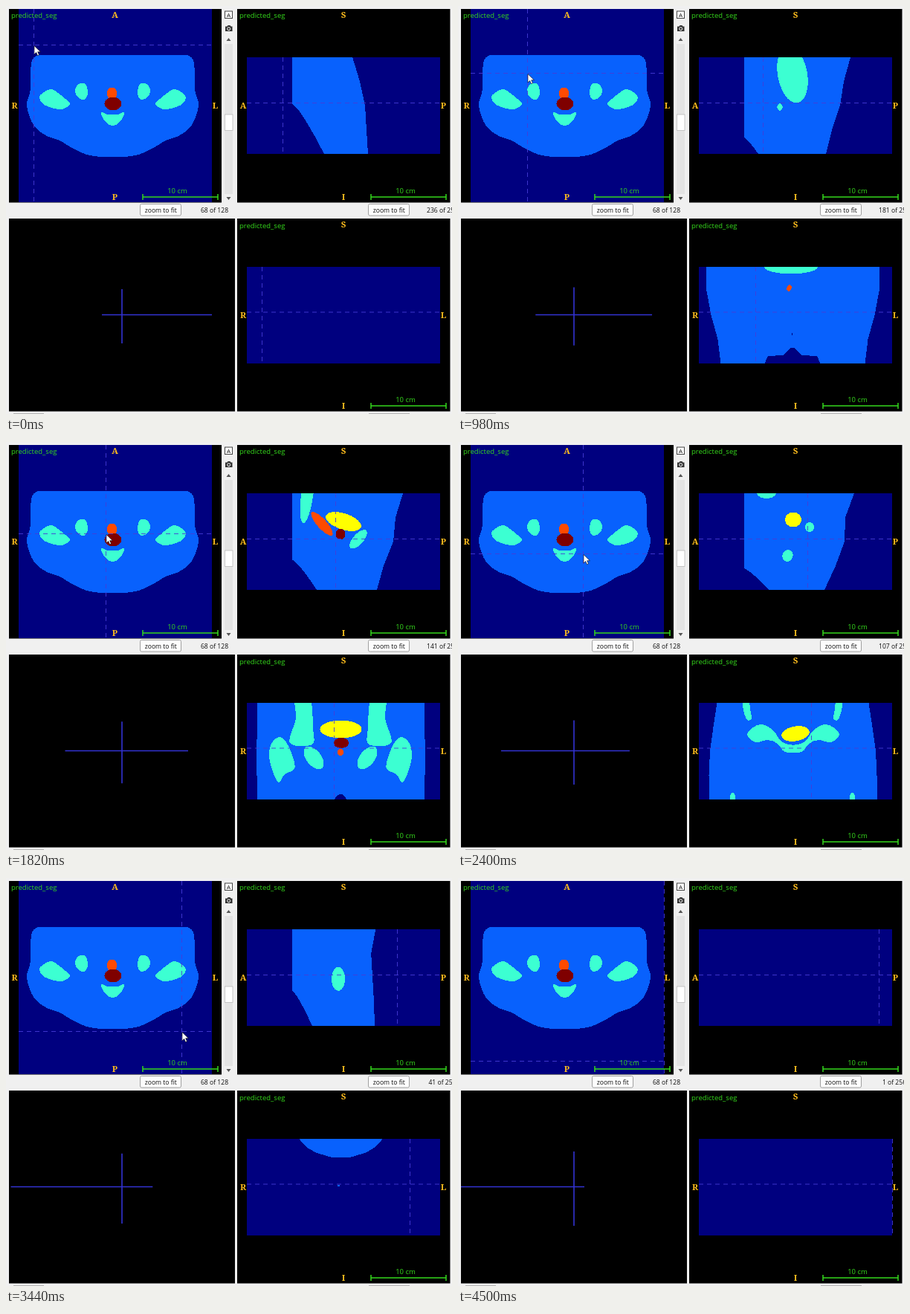
Animation of 600 by 549 pixels, one loop 4520 ms. Source, as an HTML page:

```html
<!DOCTYPE html>
<html lang="en">
<head>
<meta charset="utf-8">
<title>Segmentation viewer</title>
<style>
html, body { margin: 0; width: 100%; height: 100%; overflow: hidden; background: #f0f0f0; }
svg { display: block; width: 600px; height: 549px; }
text { font-family: "Open Sans", sans-serif; font-size: 8.6px; fill: #111; }
.tag, .cm { font-size: 9.5px; fill: #35d81c; }
.dir { font: bold 11.5px "Noto Serif", serif; fill: #ffbe1e; text-anchor: middle; }
.mid { text-anchor: middle; }
.scale { stroke: #35d81c; stroke-width: 1.5; fill: none; }
.dash { stroke: #463cd7; stroke-opacity: .88; stroke-dasharray: 6 5; fill: none; }
.axes { stroke: #3232d2; stroke-width: 1.6; fill: none; }
.btn { fill: #fdfdfd; stroke: #a0a0a0; }
.seg { shape-rendering: crispEdges; }
</style>
</head>
<body>
<svg viewBox="0 0 600 549">
  <defs>
    <clipPath id="sagClip"><rect x="324" y="69" width="260" height="130"/></clipPath>
    <clipPath id="corClip"><rect x="324" y="351" width="260" height="130"/></clipPath>
    <clipPath id="view3d"><rect x="4" y="286" width="304" height="259"/></clipPath>
    <g id="ruler"><path class="scale" d="M.5 0H101.5M.5-4V4M101.5-4V4"/><text class="cm mid" x="47" y="-5">10 cm</text></g>
  </defs>
  <rect width="600" height="549" fill="#f0f0f0"/>
  <path d="M4 4H290V264.5H4zM311 4H597.5V264.5H311zM4 286H308V545.5H4zM311 286H597.5V545.5H311z"/>
  <path class="seg" d="M17 4H277V264H17zM324 69H584V199H324zM324 351H584V481H324z" fill="#00007f"/>

  <g class="seg" id="axial"></g>
  <g class="seg" id="sag" clip-path="url(#sagClip)"></g>
  <g class="seg" id="cor" clip-path="url(#corClip)"></g>

  <path class="dash" id="axV"/><path class="dash" id="axH"/>
  <path class="dash" id="sagV"/><path class="dash" d="M324 130.5H584"/>
  <path class="dash" id="corV"/><path class="dash" d="M324 412H584"/>
  <path class="axes" id="axes" clip-path="url(#view3d)"/>

  <text class="tag" x="7" y="16">predicted_seg</text>
  <text class="tag" x="314" y="16">predicted_seg</text>
  <text class="tag" x="314" y="298.5">predicted_seg</text>
  <g id="dirs"></g>
  <use href="#ruler" x="183.5" y="257"/>
  <use href="#ruler" x="490.5" y="257"/>
  <use href="#ruler" x="490.5" y="538"/>

  <g id="bar">
    <rect x="294" y="51" width="11" height="202" fill="#e4e4e4"/>
    <rect x="294.5" y="146" width="10.5" height="21.5" fill="#fff" stroke="#bbb" stroke-width=".8"/>
    <path d="M296.5 47 299.5 43 302.5 47zM296.500 257 299.500 261 302.500 257z" fill="#555"/>
    <rect x="294.5" y="7" width="10" height="9.5" fill="#fff" stroke="#444"/>
    <text class="mid" x="299.5" y="15" style="font-size:8px">A</text>
    <path d="M295 27.5H297.5L298.500 26H301.500L302.500 27.500H304.500V34H295z" fill="#333"/>
    <circle cx="299.7" cy="30.7" r="2" fill="#333" stroke="#fff"/>
  </g>
  <rect class="btn" x="180.5" y="266.5" width="55" height="15.5" rx="2"/>
  <rect class="btn" x="487.5" y="266.5" width="55" height="15.5" rx="2"/>
  <path d="M10 548.5H51M488 548.5H543" stroke="#b0b0b0"/>
  <text class="mid" x="208.3" y="277.5">zoom to fit</text>
  <text class="mid" x="515.3" y="277.5">zoom to fit</text>
  <text class="mid" x="280.5" y="277.5">68 of 128</text>
  <text class="mid" x="587" y="277.5" id="slice"></text>
  <path id="mouse" d="M0 0V11.5L2.7 9 4.5 13.2 6.5 12.3 4.7 8.2H8.4z" fill="#fff" stroke="#000" stroke-width=".6"/>
</svg>
<script>
const LOOP = 4520, STEP = 20;
const DARK = '#00007f', BODY = '#0861fd', BONE = '#3cffd2', ORANGE = '#ff4a00', YELLOW = '#ffff00', RED = '#7f0000';
const $ = id => document.getElementById(id);
const lerp = (a, b, k) => a + (b - a) * k;

function add(parent, name, attrs) {
  const el = document.createElementNS('http://www.w3.org/2000/svg', name);
  for (const k in attrs) el.setAttribute(k, attrs[k]);
  return parent.appendChild(el);
}

const pts = s => s.split(',').map(q => q.trim().split(' ').map(Number));
const flip = (p, axis) => p.map(([x, y]) => [2 * axis - x, y]);
const sym = (half, axis) => [...half, ...flip(half, axis).reverse()];

// Ellipse outline turned clockwise by deg
function blob(cx, cy, rx, ry, deg = 0) {
  const r = deg * Math.PI / 180, n = 12;
  return Array.from({ length: n }, (_, i) => {
    const a = 2 * Math.PI * i / n, x = rx * Math.cos(a), y = ry * Math.sin(a);
    return [cx + x * Math.cos(r) - y * Math.sin(r), cy + x * Math.sin(r) + y * Math.cos(r)];
  });
}

// Vertical edge with evenly spaced rows
const edge = (xs, y0, h) => xs.map((x, i) => [x, y0 + h * i / (xs.length - 1)]);

// Side view: straight front that recedes below the cut, and a back edge
function sideBody(cut, foot, ...back) {
  const front = [0, .15, .35, .65, 1].map(k => [lerp(385, foot, k ** .8), lerp(cut, 199, k)]);
  return [[385, 69], ...front, ...edge(back, 69, 130).reverse()];
}

const frontBody = (h, ...half) => sym(edge(half.map(w => 450.5 - w), 351, h), 450.5);

const polygon = p => 'M' + p.map(q => q.map(v => v.toFixed(1)).join(' ')).join('L') + 'z';

// Closed Catmull-Rom curve through the points
function curve(p) {
  const n = p.length, at = i => p[(i + n) % n];
  let d = 'M' + p[0].join(' ');
  for (let i = 0; i < n; i++) {
    const [a, b, c, e] = [at(i - 1), at(i), at(i + 1), at(i + 2)];
    const h = [0, 1].map(j => b[j] + (c[j] - a[j]) / 6), g = [0, 1].map(j => c[j] - (e[j] - b[j]) / 6);
    d += 'C' + [...h, ...g, ...c].map(v => v.toFixed(1)).join(' ');
  }
  return d + 'z';
}

function scaled(p, k) {
  const c = [0, 1].map(j => p.reduce((s, q) => s + q[j], 0) / p.length);
  return p.map(q => q.map((v, j) => lerp(c[j], v, k)));
}

// Cross-section outline at a position: morphs between keys, grows in and shrinks out at the ends
function outline({ keys, from, to }, pos) {
  if (pos < from || pos > to) return null;
  const [first, a] = keys[0], [last, z] = keys[keys.length - 1];
  if (pos <= first) return from < first ? scaled(a, Math.sqrt((pos - from) / (first - from))) : a;
  if (pos >= last) return to > last ? scaled(z, Math.sqrt((to - pos) / (to - last))) : z;
  const i = keys.findIndex(k => k[0] > pos), [p0, A] = keys[i - 1], [p1, B] = keys[i];
  const k = (pos - p0) / (p1 - p0);
  return A.map((q, j) => [lerp(q[0], B[j][0], k), lerp(q[1], B[j][1], k)]);
}

function track(group, fill, from, to, keys, opt = {}) {
  return { keys, from, to, draw: curve, ...opt, el: add($(group), 'path', { fill }) };
}

function show(tr, pos) {
  const p = outline(tr, pos);
  let d = p ? tr.draw(p) : '';
  if (p && tr.mirror) d += tr.draw(flip(p, 450));
  tr.el.setAttribute('d', d);
}

// Axial slice
const MID = 143.5;
const femur = pts('46 120,60 112,70 117,80 125,86 132,75 139,58 136,48 130');
const pubis = pts('93 113,98 105,107 105,110 118,105 126,96 122');
[
  [BODY, sym(pts('100 66,50 66,41 67,34 77,33 112,28 132,33 152,41 165,55 175,72 181,91 192,118 202'), MID)],
  [BONE, femur], [BONE, flip(femur, MID)], [BONE, pubis], [BONE, flip(pubis, MID)],
  [BONE, sym(pts('137 146,128 143,131 152,139 160'), MID)],
  [ORANGE, blob(142.5, 117.5, 6.7, 8)],
  [RED, blob(144, 131.5, 11.5, 9)]
].forEach(([fill, p]) => add($('axial'), 'path', { fill, d: curve(p) }));

// Sagittal slices, by distance from the midline
const CENTRE = 143, NONE = -Infinity;
const sag = [
  track('sag', BODY, NONE, 117, [
    [8.5, sideBody(158, 418, 534, 524, 521, 508, 499)],
    [26, sideBody(170, 418, 533, 521, 520, 508, 493)],
    [49.5, sideBody(177, 404, 528, 519, 514, 503, 495)],
    [53.5, sideBody(176, 404, 526, 516, 514, 501, 494)],
    [93.5, sideBody(151, 412, 497, 491, 493, 495, 496)],
    [105.5, sideBody(131, 428, 466, 476, 483, 485, 487)]
  ], { draw: polygon }),
  track('sag', BONE, NONE, 33, [[8.5, blob(405, 72, 8, 38, 8)], [26, blob(415, 68, 13, 8)]]),
  track('sag', BONE, 35, 99, [
    [49.5, blob(450, 92, 20, 39, -10)], [53.5, blob(454, 94, 18, 36, -6)], [93.5, blob(447, 136, 9, 16)]
  ]),
  track('sag', BONE, 14, 52.5, [
    [26, blob(443.5, 153, 7, 8, 20)], [41, blob(435, 133, 11, 18)], [49.5, blob(433, 136, 3.5, 4.5)]
  ]),
  track('sag', BONE, NONE, 33, [[8.5, blob(474, 131, 7, 16, 42)], [26, blob(473, 114.5, 6, 6.5)]]),
  track('sag', ORANGE, NONE, 14, [[8.5, blob(425, 110, 6.5, 21, -42)]]),
  track('sag', YELLOW, NONE, 32, [[8.5, blob(454, 107, 25, 11, 18)], [26, blob(451, 104.5, 11, 10)]]),
  track('sag', RED, NONE, 12, [[0, blob(451, 123.5, 9, 9.5)], [8.5, blob(450, 124, 6.5, 7.5)]])
];

// Coronal slices, by depth
const cor = [
  track('cor', BODY, 65, 213, [
    [65, frontBody(110, 109, 108, 100, 88, 60)],
    [90, frontBody(130, 117, 116, 110, 101, 97)],
    [123.5, frontBody(130, 112, 112.5, 113.5, 113, 112)],
    [150, frontBody(130, 102, 107, 111.5, 113, 113)],
    [172.5, frontBody(130, 98.5, 89, 94, 97, 100)],
    [206, frontBody(25, 56, 51, 44, 33, 12)],
    [213, frontBody(0, 20, 15, 10, 5, 0)]
  ], { draw: polygon }),
  track('cor', DARK, 65, 132, [
    [65, sym(pts('378 482,400 460,430 455,448 442'), 450)],
    [90, sym(pts('412 482,417 471,437 470,448 460'), 450)],
    [123.5, sym(pts('441 482,443 479,446 475,449 474'), 450)]
  ], { draw: polygon }),
  track('cor', DARK, 86, 94, [[90, blob(449.5, 441, 1, 1.5)]]),
  track('cor', DARK, 160, 190, [[172.5, pts('422 482,427 474,434 482')]], { draw: polygon, mirror: true }),
  track('cor', DARK, 168, 177, [[172.5, blob(444, 353.5, 2, 1.2)]]),
  track('cor', BODY, 203, 209, [[206, blob(447.5, 414, 1.6, 1.4)]]),
  track('cor', BONE, 76, 98, [[90, blob(448, 351, 36, 9.5)]]),
  track('cor', BONE, 104, 157, [
    [123.5, pts('389 345,390 372,382 405,412 407,413 385,409 345')],
    [150, pts('383 345,384 361,389 374,395 372,393 360,391 345')]
  ], { mirror: true }),
  track('cor', BONE, 108, 141, [
    [123.5, pts('367 397,356 408,355 430,366 458,375 447,388 440,386 424,377 404')]
  ], { mirror: true }),
  track('cor', BONE, 103, 134, [[123.5, blob(414, 425, 10, 18, -38)]], { mirror: true }),
  track('cor', BONE, 140, 160, [[150, blob(369.5, 481, 4, 9)]], { mirror: true }),
  track('cor', BONE, 133, 162, [
    [150, sym(pts('445 407,434 402,424 388,409 380,397 384,389 394,400 404,417 401,430 406,440 417'), 451)]
  ]),
  track('cor', YELLOW, 108, 159, [[123.5, blob(450.5, 386.5, 28, 12)], [150, blob(454, 392.5, 19, 10, -10)]]),
  track('cor', RED, 119, 141, [[123.5, blob(451, 405, 10, 7)]]),
  track('cor', ORANGE, 86, 127, [
    [90, blob(445.5, 379.5, 3, 4.5, 20)], [107, blob(450, 402, 6, 8)], [123.5, blob(450, 417.5, 4, 5)]
  ])
];

[['A', 146.5, 16], ['P', 146.5, 261], ['R', 11.5, 138], ['L', 281.5, 138],
 ['S', 454, 16], ['I', 454, 261], ['A', 319, 138], ['P', 588.5, 138],
 ['S', 454, 298], ['I', 454, 542], ['R', 319, 420], ['L', 588.5, 420]
].forEach(([s, x, y]) => { add($('dirs'), 'text', { class: 'dir', x, y }).textContent = s; });

// Pointer travel: time, sagittal slice, depth
const PATH = [[0, 236, 52], [980, 181, 90], [1820, 141, 123.5], [2400, 107, 150], [2760, 80, 172.5], [3440, 41, 206], [4500, 1, 246]];

function travel(t) {
  const i = PATH.findIndex((p, j) => j && p[0] >= t), a = PATH[i - 1], b = PATH[i];
  const k = (t - a[0]) / (b[0] - a[0]);
  return [lerp(a[1], b[1], k), lerp(a[2], b[2], k)];
}

function render(t) {
  const [s, y] = travel(t), n = Math.round(s), x = 277 - (n - 1) * 1.019;
  const px = Math.floor(x) + .5, py = Math.floor(y) + .5, p = (y - 52) / 194;
  const left = 129 - 117 * p - 47 * p * p, right = 277 - 75 * p - 32 * p * p;
  sag.forEach(o => show(o, Math.abs(x - CENTRE)));
  cor.forEach(o => show(o, y));
  $('axV').setAttribute('d', `M${px} 4V264`);
  $('axH').setAttribute('d', `M17 ${py}H277`);
  $('sagV').setAttribute('d', `M${py + 320} 69V199`);
  $('corV').setAttribute('d', `M${px + 307} 351V481`);
  $('axes').setAttribute('d', `M${left} 415.5H${right}M156 ${381 - 13 * p}V${454 + 14 * p}`);
  $('slice').textContent = n + ' of 256';
  $('mouse').setAttribute('transform', `translate(${px + .5} ${py + 1})`);
  $('mouse').setAttribute('visibility', x < 276 ? 'visible' : 'hidden');
}

const start = performance.now();
function tick() {
  const t = (performance.now() - start) % LOOP;
  render(Math.floor(t / STEP) * STEP);
  requestAnimationFrame(tick);
}
tick();
</script>
</body>
</html>
```
